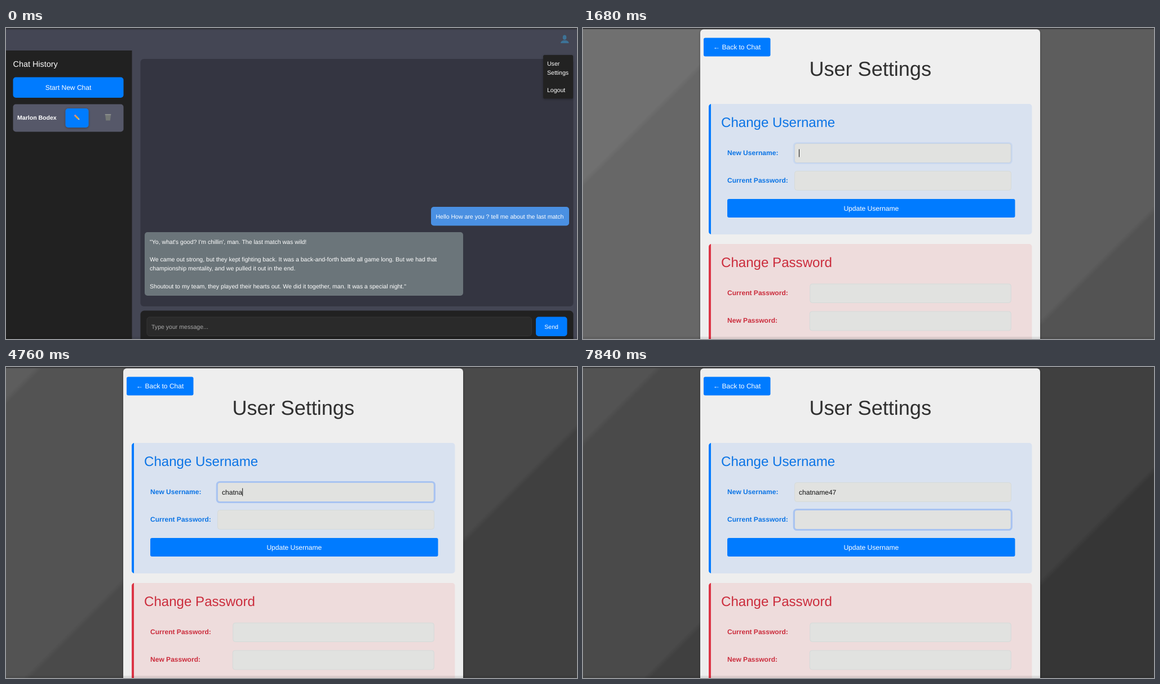
These frames come from a looping animation (1013 px wide and 553 px high, 8 s). An HTML page:

```html
<!DOCTYPE html>
<html lang="en">
<head>
<meta charset="utf-8">
<title>Chat settings</title>
<style>
  html, body { margin: 0; width: 100%; height: 100%; overflow: hidden; background: #444654; }
  svg { display: block; width: 100%; height: 100%; }
  text { font-family: "Liberation Sans", Arial, sans-serif; text-rendering: geometricPrecision; white-space: pre; }
  .b { font-weight: bold; }
  .mid { text-anchor: middle; }
  #chat { font-size: 10.55px; fill: #fff; }
  #settings { font-size: 12.05px; }
  .accent { fill: #007bff; }
  .field { fill: #e1e2e0; stroke: #d5dad9; }
  .ring { fill: none; stroke: #a8c3f1; stroke-width: 3.2; }
  .blue { fill: #0b74e5; }
  .red { fill: #cb2c3c; }
  .title { font-size: 24.1px; }
</style>
</head>
<body>
<svg viewBox="0 0 1013 553" preserveAspectRatio="none">
  <defs>
    <linearGradient id="bands" gradientUnits="userSpaceOnUse" x1="0" y1="0" x2="2120" y2="2120"></linearGradient>
    <linearGradient id="topShade" x2="0" y2="1">
      <stop stop-color="#222" stop-opacity=".75"/><stop offset="1" stop-color="#222" stop-opacity="0"/>
    </linearGradient>
    <filter id="shadow" x="-20%" y="-20%" width="140%" height="140%">
      <feDropShadow dx="0" dy="1" stdDeviation="2" flood-opacity=".3"/>
    </filter>
    <clipPath id="panels">
      <rect x="223" y="135" width="573.5" height="232" rx="5"/>
      <rect x="223" y="384" width="573.5" height="200" rx="5"/>
    </clipPath>
  </defs>

  <g id="chat">
    <rect width="1013" height="553" fill="#444654"/>
    <rect width="1013" height="4" fill="url(#topShade)"/>
    <rect y="40" width="223.5" height="513" fill="#212121"/>
    <g fill="#3d7296">
      <ellipse cx="991" cy="16.8" rx="3.3" ry="4.3"/>
      <path d="M984 27q0-4 5-5h4.500q5 1 5 5z"/>
    </g>
    <text x="12.500" y="69" font-size="14.4">Chat History</text>
    <rect class="accent" x="12.500" y="87.500" width="196" height="36.500" rx="5"/>
    <text class="mid" x="110.500" y="109.800" font-size="12.050">Start New Chat</text>
    <rect x="12.500" y="135.500" width="196" height="49" rx="5" fill="#565869"/>
    <text class="b" x="20" y="163">Marlon Bodex</text>
    <rect class="accent" x="105.500" y="143" width="41" height="34" rx="5" filter="url(#shadow)"/>
    <g transform="translate(126 159) rotate(45)">
      <rect x="-3.500" y="-1.500" width="7" height="3" fill="#e8a33c"/>
      <rect x="-6" y="-1.500" width="2.500" height="3" fill="#e58a8f"/>
      <path d="M3.500-1.500L6.500 0 3.500 1.500z" fill="#e5d3b5"/>
    </g>
    <path d="M176 154h10l-1.200 10.500h-7.600z" fill="#747876"/>
    <rect x="175.500" y="153" width="11" height="2" rx="1" fill="#8a8d8c"/>

    <rect x="238.500" y="55" width="768" height="440" rx="6" fill="#343541"/>
    <rect x="754" y="318" width="245" height="33.500" rx="5" fill="#4a90e2"/>
    <text x="762.500" y="338.500">Hello How are you ? tell me about the last match</text>
    <rect x="246" y="363" width="565" height="113" rx="5" fill="#6b757a"/>
    <text x="255" y="383.500">"Yo, what's good? I'm chillin', man. The last match was wild!</text>
    <text x="255" y="415">We came out strong, but they kept fighting back. It was a back-and-forth battle all game long. But we had that</text>
    <text x="255" y="431">championship mentality, and we pulled it out in the end.</text>
    <text x="255" y="462.800">Shoutout to my team, they played their hearts out. We did it together, man. It was a special night."</text>

    <rect x="238.500" y="502.500" width="768" height="70" rx="7" fill="#212121"/>
    <rect x="250" y="514" width="682.500" height="33.500" rx="5" fill="#2a2a2a" stroke="#353535"/>
    <text x="258" y="534.500" fill="#a9a9a9">Type your message...</text>
    <rect class="accent" x="940" y="513.500" width="55.500" height="34.500" rx="5"/>
    <text class="mid" x="967.600" y="534.500">Send</text>

    <rect x="953" y="48" width="53" height="77.500" rx="3" fill="#202020" filter="url(#shadow)"/>
    <rect id="hover" x="953" y="48" width="53" height="47" rx="3" fill="#444"/>
    <text x="960" y="67">User</text>
    <text x="960" y="83">Settings</text>
    <text x="960" y="114">Logout</text>
  </g>

  <g id="settings">
    <rect width="1013" height="553" fill="url(#bands)"/>
    <rect width="1013" height="2" fill="#38383a"/>
    <rect x="208" y="2.500" width="603" height="570" rx="6" fill="#eee" filter="url(#shadow)"/>
    <rect id="sheen" x="208" y="2.500" width="603" height="570" rx="6" fill="#fff"/>
    <rect class="accent" x="214" y="17.500" width="118.500" height="33" rx="3"/>
    <text x="231" y="38.300" fill="#fff">← Back to Chat</text>
    <text class="mid" x="509.700" y="85" font-size="36.100" fill="#303030">User Settings</text>

    <g clip-path="url(#panels)">
      <rect x="223" y="135" width="574" height="232" fill="#d9e2f0"/>
      <rect x="223" y="384" width="574" height="170" fill="#eedcdc"/>
      <rect class="accent" x="223" y="135" width="4" height="232"/>
      <rect x="223" y="384" width="4" height="170" fill="#dc3545"/>
    </g>

    <g class="blue">
      <text class="title" x="245" y="175.500">Change Username</text>
      <text class="b" x="256" y="226">New Username:</text>
      <text class="b" x="256" y="275">Current Password:</text>
    </g>
    <rect class="field" x="375.500" y="205.500" width="384" height="34" rx="4"/>
    <rect class="field" x="375.500" y="254.500" width="384" height="34" rx="4"/>
    <rect class="ring" x="374.300" y="204.500" width="386" height="36" rx="5"/>
    <rect class="ring" x="374.300" y="253.500" width="386" height="36" rx="5"/>
    <text id="typed" x="383" y="226.500" fill="#111"></text>
    <rect id="caret" width="1" height="14" fill="#111"/>
    <rect class="accent" x="256" y="304" width="510.500" height="33" rx="3"/>
    <text class="mid" x="511.300" y="324.600" fill="#fff">Update Username</text>

    <g class="red">
      <text class="title" x="245" y="424.500">Change Password</text>
      <text class="b" x="256" y="475">Current Password:</text>
      <text class="b" x="256" y="524">New Password:</text>
    </g>
    <rect class="field" x="402.800" y="455" width="356.500" height="33.500" rx="4"/>
    <rect class="field" x="402.300" y="504" width="357" height="34" rx="4"/>
  </g>
  <rect y="549" width="1013" height="4" fill="#000" opacity=".08"/>
</svg>

<script>
const LOOP = 8000, OPEN = 560, FOCUS = 1680, NEXT = 7140;
const NAME = 'chatname47';
const KEYS = [4130, 4200, 4340, 4410, 4480, 4690, 5040, 5320, 6580, 6790];
const $ = id => document.getElementById(id);
const rings = document.querySelectorAll('.ring');
const clamp = v => Math.max(0, Math.min(1, v));
const fade = (t, start) => clamp((t - start + 70) / 210);
const show = (el, on) => { el.style.display = on ? '' : 'none'; };

// Grey steps along the page diagonal; the whole ramp slides up and left.
const bands = $('bands');
for (let k = 0; k < 8; k++) {
  const edge = 415 + 530 * k;
  for (const side of [0, 1]) {
    const stop = document.createElementNS('http://www.w3.org/2000/svg', 'stop');
    const grey = Math.round(122 - 9.7 * (k + side));
    stop.setAttribute('offset', (edge + (side ? 7 : -7)) / 4240);
    stop.setAttribute('stop-color', `rgb(${grey},${grey},${grey})`);
    bands.append(stop);
  }
}

function draw(t) {
  const open = t >= OPEN;
  show($('chat'), !open);
  show($('settings'), open);
  show($('hover'), t >= 210);
  if (!open) return;

  const left = 1 - (t - OPEN) / (LOOP - OPEN);
  const shift = -1200 * (1 - left * left);
  bands.setAttribute('gradientTransform', `translate(${shift} ${shift})`);
  $('sheen').style.opacity = 0.2 * clamp(1 - (t - OPEN) / 1500);

  const next = fade(t, NEXT);
  rings[0].style.opacity = fade(t, FOCUS) * (1 - next);
  rings[1].style.opacity = next;

  const count = KEYS.filter(k => k <= t).length;
  const typed = $('typed'), caret = $('caret');
  typed.textContent = NAME.slice(0, count);

  // The caret restarts its blink at every key press and focus change.
  const second = t >= NEXT;
  const since = t - (second ? NEXT : count ? KEYS[count - 1] : FOCUS);
  show(caret, t >= FOCUS && since % 1000 < 500);
  caret.setAttribute('x', 383 + (second || !count ? 0 : typed.getComputedTextLength()));
  caret.setAttribute('y', second ? 264.5 : 215.5);
}

const begin = performance.now();
function tick() {
  draw((performance.now() - begin) % LOOP);
  requestAnimationFrame(tick);
}
tick();
</script>
</body>
</html>
```
